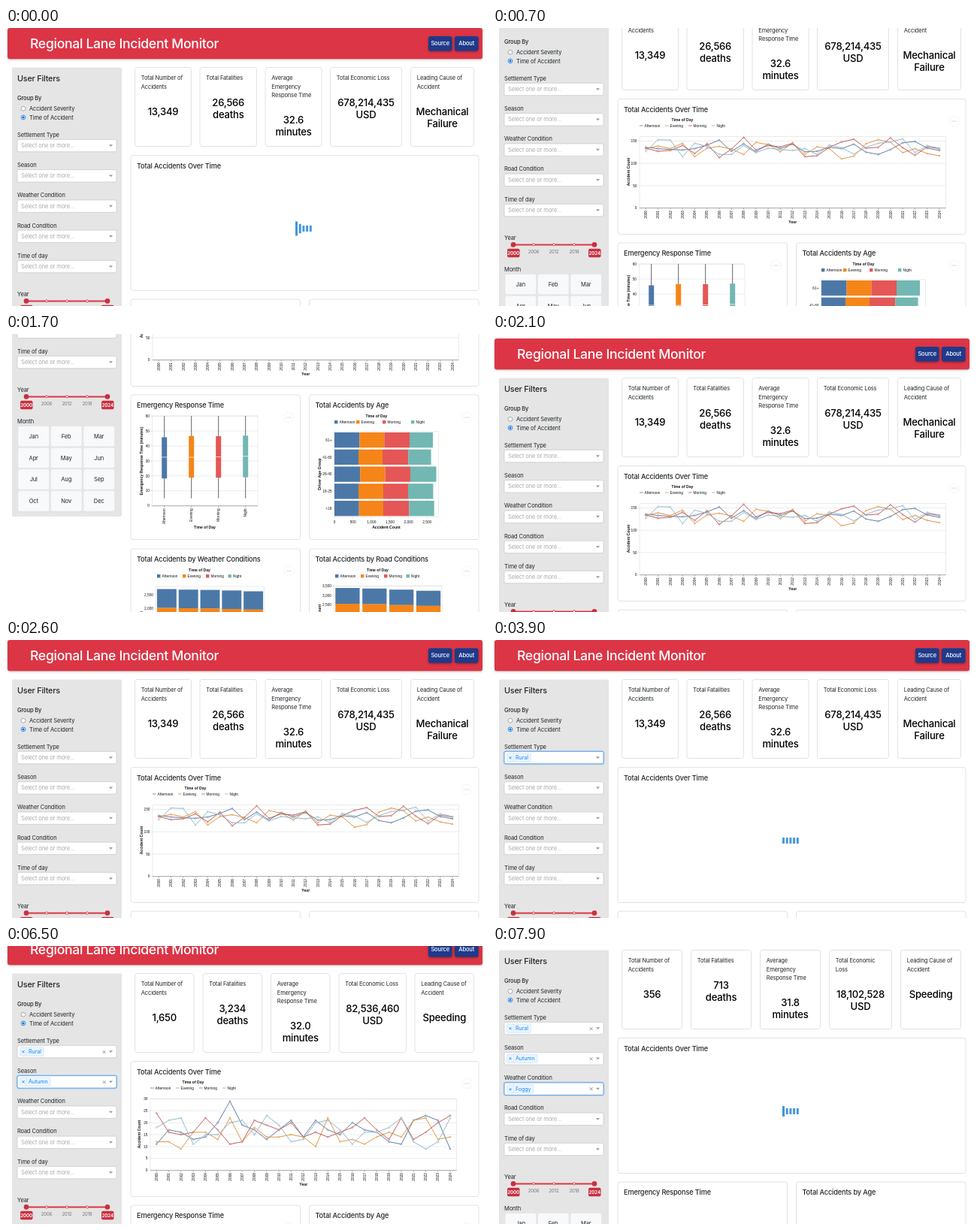
An HTML page with a canvas for the animation above (8000 ms loop, 640 by 370 pixels).

```html
<!DOCTYPE html>
<html lang="en">
<head>
<meta charset="utf-8">
<title>Road incident dashboard</title>
<style>
html, body { margin: 0; width: 100%; height: 100%; overflow: hidden; background: #fff; }
canvas { display: block; width: 640px; height: 370px; }
</style>
</head>
<body>
<canvas id="stage"></canvas>
<script>
const W = 640, H = 370, LOOP = 8000, STEP = 100;
const canvas = document.getElementById('stage');
const ctx = canvas.getContext('2d');
const dpr = window.devicePixelRatio || 1;
canvas.width = W * dpr;
canvas.height = H * dpr;

const UI = 'Inter, sans-serif', PLOT = '"Liberation Sans", Arial, sans-serif';
const INK = '#212529', RED = '#dc3545', KNOB = '#c9303f';
const PERIODS = ['Afternoon', 'Evening', 'Morning', 'Night'];
const FILLS = ['#4c78a8', '#f58518', '#e45756', '#72b7b2'];
const STROKES = ['#57799f', '#dc923f', '#bd5754', '#8db6ca'];

// Time, scroll position
const SCROLL = [[500, 0], [600, 20], [800, 130], [1000, 250], [1200, 350], [1400, 392], [1500, 396],
  [1600, 355], [1700, 280], [1800, 180], [1900, 85], [2000, 15], [2100, -6], [2300, -3], [2600, 0],
  [5900, 0], [6000, 3], [6500, 16], [6700, 40], [6800, 47]];
const LOADS = [[-300, 200], [3900, 4300], [6000, 6400], [7740, 8300]];

const CARD_LABELS = [['Total Number of', 'Accidents'], ['Total Fatalities'],
  ['Average', 'Emergency', 'Response Time'], ['Total Economic Loss'], ['Leading Cause of', 'Accident']];
const SUMMARIES = [
  { from: 0, x: [171.5, 258, 345, 431.5, 538.5], right: [246.5, 333.5, 420, 526.5, 622.5],
    values: ['13,349', '26,566|deaths', '32.6|minutes', '678,214,435|USD', 'Mechanical|Failure'] },
  { from: 4000, x: [171.5, 258, 345, 431.5, 538.5], right: [246.5, 333.5, 420, 526.5, 622.5],
    values: ['6,652', '13,214|deaths', '32.4|minutes', '336,870,212|USD', 'Mechanical|Failure'] },
  { from: 6200, x: [171.5, 262, 352.5, 443, 544], right: [250, 340.5, 431, 532.5, 622.5],
    values: ['1,650', '3,234|deaths', '32.0|minutes', '82,536,460|USD', 'Speeding'] },
  { from: 7800, x: [171.5, 263.5, 355.5, 447.5, 542.5], right: [251.5, 343.5, 435.5, 530.5, 622.5],
    values: ['356', '713|deaths', '31.8|minutes', '18,102,528|USD', 'Speeding'], wrapLoss: true }
];

const FILTERS = [
  { label: 'Settlement Type', y: 142, tag: 'Rural', open: 3000, pick: 3600, close: 3900, clear: 4000, blur: 5000,
    options: ['Rural', 'Urban'], hover: 0 },
  { label: 'Season', y: 182.3, tag: 'Autumn', open: 5000, pick: 5800, close: 6000, clear: 6100, blur: 7000,
    options: ['Autumn', 'Spring', 'Summer', 'Winter'], hover: 0 },
  { label: 'Weather Condition', y: 222.6, tag: 'Foggy', open: 7000, pick: 7500, close: 7600, clear: 7700, blur: 9000,
    options: ['Clear', 'Foggy', 'Rainy', 'Snowy', 'Windy'], hover: 1 },
  { label: 'Road Condition', y: 262.8 },
  { label: 'Time of day', y: 303 }
];

function seeded(seed) {
  return () => (seed = (seed * 16807) % 2147483647) / 2147483647;
}
const random = seeded(4217);
const ruralSeries = PERIODS.map(() => Array.from({ length: 25 }, () => 54 + Math.round(random() * 27)));

const TRENDS = [
  { from: 0, max: 160, tick: 50, dx: 0, series: [
    [136, 133, 131, 130, 133, 141, 152, 127, 144, 126, 143, 133, 143, 126, 127, 136, 133, 143, 125, 120, 131, 146, 149, 134, 129],
    [133, 139, 133, 145, 115, 134, 138, 132, 120, 147, 142, 126, 146, 120, 137, 133, 110, 116, 144, 153, 147, 124, 133, 122, 117],
    [134, 127, 129, 140, 122, 144, 113, 132, 158, 130, 140, 137, 145, 115, 117, 136, 148, 154, 134, 136, 157, 135, 118, 137, 133],
    [127, 153, 152, 115, 145, 138, 120, 120, 140, 124, 134, 131, 129, 133, 120, 141, 135, 121, 136, 145, 148, 155, 124, 140, 134]] },
  { from: 4300, max: 90, tick: 20, dx: -3, series: ruralSeries },
  { from: 6400, max: 30, tick: 5, dx: -3, series: [
    [11, 17, 16, 13, 14, 20, 29, 19, 17, 13, 17, 21, 14, 21, 17, 15, 20, 17, 16, 12, 11, 21, 23, 21, 9],
    [12, 12, 9, 16, 16, 13, 22, 12, 18, 14, 14, 15, 14, 10, 22, 12, 13, 11, 14, 16, 14, 21, 22, 13, 14],
    [24, 16, 15, 16, 22, 17, 11, 12, 21, 19, 17, 20, 14, 16, 14, 16, 18, 22, 17, 13, 22, 13, 16, 20, 23],
    [18, 21, 22, 11, 15, 15, 20, 21, 15, 23, 19, 12, 13, 20, 21, 17, 11, 16, 16, 18, 22, 12, 9, 12, 22]] }
];

const latest = (states, t) => states.filter(s => s.from <= t).pop();

function scrollAt(t) {
  const i = SCROLL.findIndex(k => k[0] > t);
  if (i === 0) return 0;
  if (i < 0) return SCROLL[SCROLL.length - 1][1];
  const [t0, y0] = SCROLL[i - 1], [t1, y1] = SCROLL[i];
  return Math.round(y0 + (y1 - y0) * (t - t0) / (t1 - t0));
}

// The y coordinate is the middle of the capitals.
function text(s, x, y, size, { weight = 400, color = INK, align = 'left', font = UI, turn = 0 } = {}) {
  ctx.save();
  ctx.translate(x, y);
  ctx.rotate(turn);
  ctx.font = `${weight} ${size}px ${font}`;
  ctx.letterSpacing = font === UI ? `${-0.017 * size}px` : '0px';
  ctx.textAlign = align;
  ctx.fillStyle = color;
  ctx.fillText(s, 0, size * 0.36);
  ctx.restore();
}

function plotText(s, x, y, align = 'center', bold = false, upright = false) {
  text(s, x, y, bold ? 5.1 : 4.8, { weight: bold ? 700 : 400, align, font: PLOT, color: '#111',
    turn: upright ? -Math.PI / 2 : 0 });
}

function rect(x, y, w, h, fill) {
  ctx.fillStyle = fill;
  ctx.fillRect(x, y, w, h);
}

function box(x, y, w, h, r, fill, stroke, width = 1) {
  ctx.beginPath();
  ctx.roundRect(x, y, w, h, r);
  if (fill) { ctx.fillStyle = fill; ctx.fill(); }
  if (stroke) { ctx.strokeStyle = stroke; ctx.lineWidth = width; ctx.stroke(); }
}

function shadowBox(x, y, w, h, r, fill, blur, shade) {
  ctx.save();
  ctx.shadowColor = shade;
  ctx.shadowBlur = blur * dpr;
  ctx.shadowOffsetY = dpr;
  box(x, y, w, h, r, fill);
  ctx.restore();
}

function line(x0, y0, x1, y1, color, width = 0.6) {
  ctx.beginPath();
  ctx.moveTo(x0, y0);
  ctx.lineTo(x1, y1);
  ctx.strokeStyle = color;
  ctx.lineWidth = width;
  ctx.stroke();
}

function disc(x, y, r, fill, stroke, width = 1) {
  ctx.beginPath();
  ctx.arc(x, y, r, 0, Math.PI * 2);
  if (fill) { ctx.fillStyle = fill; ctx.fill(); }
  if (stroke) { ctx.strokeStyle = stroke; ctx.lineWidth = width; ctx.stroke(); }
}

function drawHeader() {
  shadowBox(2, 0, 632, 41.2, 3, RED, 3, 'rgba(0,0,0,.25)');
  text('Regional Lane Incident Monitor', 32, 21, 17.6, { weight: 500, color: '#fff' });
  [['Source', 562], ['About', 597]].forEach(([label, x]) => {
    shadowBox(x, 11, 31.5, 19.5, 3, '#1e3a8a', 3, 'rgba(0,0,0,.4)');
    text(label, x + 15.7, 20.7, 7.5, { weight: 500, color: '#fff', align: 'center' });
  });
}

function drawFilter(f, t) {
  const top = f.y + 6.3, mid = f.y + 14.4;
  const focused = t >= f.open && t < f.blur;
  text(f.label, 15, f.y, 7.5);
  if (focused) box(14.6, top - 0.4, 132.8, 17.3, 2.5, null, 'rgba(0,126,255,.18)', 2);
  box(15, top, 132, 16.5, 2, '#fff', focused ? '#3f8fe0' : '#ccc', 0.8);
  if (t >= f.pick) {
    ctx.font = `400 7.2px ${UI}`;
    const w = ctx.measureText(f.tag).width + 14;
    box(18.7, top + 2.5, w, 11.5, 1, '#ebf5ff', '#c2e0ff', 0.6);
    line(27.2, top + 2.5, 27.2, top + 14, '#c2e0ff');
    text('×', 22.9, mid - 0.2, 7.5, { color: '#007eff', align: 'center' });
    text(f.tag, 30, mid, 7.2, { color: '#1685f8' });
  } else {
    text('Select one or more...', 20, mid, 7.5, { color: '#aaa' });
  }
  if (t >= f.clear) text('×', 130.5, mid - 0.2, 9.5, { color: '#999', align: 'center' });
  ctx.beginPath();
  ctx.moveTo(137, mid - 1.2);
  ctx.lineTo(142, mid - 1.2);
  ctx.lineTo(139.5, mid + 1.5);
  ctx.fillStyle = '#999';
  ctx.fill();
}

function drawMenu(f, t) {
  if (!(t >= f.open && t < f.close)) return;
  const top = f.y + 23, row = 16.5;
  shadowBox(15, top, 132, row * f.options.length + 0.5, 1, '#fff', 2, 'rgba(0,0,0,.12)');
  box(15, top, 132, row * f.options.length + 0.5, 1, null, '#ccc', 0.6);
  const active = t >= f.open + 500 ? f.hover : 0;
  f.options.forEach((name, i) => {
    if (i === active) rect(15.4, top + i * row + 0.3, 131.2, row, t >= f.open + 500 ? '#e6f2ff' : '#f2f8ff');
    text(name, 20, top + (i + 0.5) * row, 7.5, { color: i === active ? '#333' : '#666' });
  });
}

function drawSidebar(t) {
  box(8, 52.5, 146, 470.5, 2, '#e5e5e5');
  text('User Filters', 15, 67, 10.8, { weight: 500 });
  text('Group By', 15, 93.6, 7.5, { weight: 500 });
  disc(23, 107.3, 2.9, '#fff', '#777', 0.6);
  disc(23, 118.9, 2.9, '#fff', '#0b6fe0', 0.8);
  disc(23, 118.9, 1.6, '#0b6fe0');
  text('Accident Severity', 31, 107.5, 7.5);
  text('Time of Accident', 31, 119, 7.5);
  FILTERS.forEach(f => drawFilter(f, t));

  text('Year', 15, 354.3, 7.5);
  line(27, 363.4, 135, 363.4, RED, 2);
  [54, 81, 108].forEach((x, i) => {
    disc(x, 363.4, 1.5, '#fff', KNOB, 0.8);
    text(String(2006 + i * 6), x, 373.3, 6, { color: '#777', align: 'center' });
  });
  [[27, '2000'], [135, '2024']].forEach(([x, year]) => {
    disc(x, 363.4, 3.3, KNOB);
    box(x - 8, 368.8, 16.5, 11.4, 2, KNOB);
    text(year, x + 0.2, 374.5, 6.2, { weight: 600, color: '#fff', align: 'center' });
  });

  text('Month', 15, 396, 7.5);
  'Jan Feb Mar Apr May Jun Jul Aug Sep Oct Nov Dec'.split(' ').forEach((month, i) => {
    const x = 16 + (i % 3) * 43.5, y = 402.5 + Math.floor(i / 3) * 28.7;
    box(x, y, 41.5, 27.3, 2.5, '#f8f9fa', '#dfe3e6', 0.6);
    text(month, x + 20.7, y + 13.7, 7.5, { align: 'center' });
  });
  FILTERS.forEach(f => drawMenu(f, t));
}

function drawSummary(t) {
  const state = latest(SUMMARIES, t);
  state.values.forEach((value, i) => {
    const x = state.x[i], right = state.right[i];
    const label = i === 3 && state.wrapLoss ? ['Total Economic', 'Loss'] : CARD_LABELS[i];
    box(x, 52.5, right - x, 105, 3, '#fff', '#d9dbdd', 0.8);
    label.forEach((s, n) => text(s, x + 8.3, 66.6 + n * 11.5, 7.5));
    value.split('|').forEach((s, n) =>
      text(s, (x + right) / 2, 99.6 + (label.length - 1) * 11.5 + n * 15.8, 13.1,
        { weight: 500, align: 'center', color: '#000' }));
  });
}

function drawLoader(x, y, elapsed) {
  for (let i = 0; i < 5; i++) {
    const phase = ((elapsed - i * 180) / 1000) % 1;
    const pulse = phase > 0 ? Math.max(0, 1 - Math.abs(phase - 0.3) / 0.3) : 0;
    const h = 8 + 11 * pulse;
    rect(x - 11.5 + i * 4.7, y - h / 2, 3, h, pulse > 0.3 ? '#3f97d8' : '#4a98dc');
  }
}

function frame(x, y, w, h, title) {
  box(x, y, w, h, 3, '#fff', '#d9dbdd', 0.8);
  text(title, x + 8, y + 14, 9.2, { weight: 500 });
}

function dots(x, y) {
  disc(x, y, 6.8, '#fff', '#f1f1f1', 0.8);
  [-2.4, 0, 2.4].forEach(d => disc(x + d, y, 0.6, '#aaa'));
}

function legend(title, y, xs, lines) {
  plotText('Time of Day', title, y, 'center', true);
  PERIODS.forEach((name, i) => {
    if (lines) line(xs[i], y + 8, xs[i] + 4.7, y + 8, STROKES[i], 0.8);
    else rect(xs[i], y + 6, 4.4, 4.4, FILLS[i]);
    plotText(name, xs[i] + 6.6, y + 8.2, 'left');
  });
}

function drawTrend(t) {
  const { max, tick, dx, series } = latest(TRENDS, t);
  const left = 195 + dx, right = 602.5 + dx, bottom = 314.6, top = 219.5;
  const px = i => 203.3 + dx + i * 16.28, py = v => bottom - v / max * (bottom - top);
  legend(252 + dx, 197, [195, 229, 260, 291].map(x => x + dx), true);
  box(left, top, right - left, bottom - top, 0, null, '#ddd', 0.6);
  for (let v = 0; v <= max; v += tick) {
    line(left - 2.4, py(v), right, py(v), '#ddd');
    plotText(String(v), left - 3.5, py(v), 'right');
  }
  line(left, bottom, right, bottom, '#888');
  for (let i = 0; i < 25; i++) {
    line(px(i), bottom, px(i), bottom + 2.4, '#888');
    plotText(String(2000 + i), px(i), bottom + 3.4, 'right', false, true);
  }
  series.forEach((values, s) => {
    ctx.beginPath();
    values.forEach((v, i) => ctx.lineTo(px(i), py(v)));
    ctx.strokeStyle = STROKES[s];
    ctx.lineWidth = 0.95;
    ctx.stroke();
    values.forEach((v, i) => disc(px(i), py(v), 0.9, '#fff', STROKES[s], 0.7));
  });
  plotText('Accident Count', left - 14.5, 266.5, 'center', true, true);
  plotText('Year', (left + right) / 2, 333, 'center', true);
  dots(613.5, 199);
}

function drawResponse() {
  const left = 194.5, right = 335, bottom = 508.7;
  const py = v => bottom - v * 1.993;
  box(left, py(60), right - left, bottom - py(60), 0, null, '#ddd', 0.6);
  for (let v = 0; v <= 60; v += 10) {
    line(left - 2.4, py(v), right, py(v), '#ddd');
    plotText(String(v), left - 3.5, py(v), 'right');
  }
  line(left, bottom, right, bottom, '#888');
  const quartiles = [[45.8, 32.5, 18.3], [46.6, 32.4, 18.8], [46.5, 32.7, 18.8], [46.9, 33.1, 19.1]];
  quartiles.forEach(([q3, median, q1], i) => {
    const x = 210.7 + i * 36;
    line(x, py(60), x, py(5), '#222', 0.7);
    rect(x - 3.5, py(q3), 7, py(q1) - py(q3), FILLS[i]);
    line(x - 3.5, py(median), x + 3.5, py(median), '#fff', 0.7);
    line(x, bottom, x, bottom + 2.4, '#888');
    plotText(PERIODS[i], x, bottom + 3.6, 'right', false, true);
  });
  plotText('Emergency Response Time (minutes)', 179.8, 449, 'center', true, true);
  plotText('Time of Day', 264.5, 537.3, 'center', true);
  dots(376.5, 391);
}

function drawAges() {
  const left = 437, right = 575.5, top = 409.7, bottom = 523.5, row = 22.75;
  legend(493, 389, [437, 466, 501, 539]);
  for (let i = 0; i <= 5; i++) {
    const x = left + i * 24.65;
    line(x, top, x, bottom + 2.4, '#ddd');
    plotText((i * 500).toLocaleString('en-US'), x, bottom + 6.3);
  }
  box(left, top, right - left, bottom - top, 0, null, '#ddd', 0.6);
  const ends = [[470.5, 503.3, 537, 568], [469, 501, 535.3, 565.6], [471.2, 504.5, 538, 572.5],
    [469, 502, 535, 568.4], [469.7, 502, 536.3, 569.7]];
  ['61+', '41-60', '26-40', '18-25', '<18'].forEach((name, r) => {
    const y = top + r * row + 1.2;
    ends[r].forEach((end, i) => {
      const start = i ? ends[r][i - 1] : left;
      rect(start, y, end - start, row - 2.4, FILLS[i]);
    });
    plotText(name, left - 3.5, y + row / 2 - 1.2, 'right');
  });
  plotText('Driver Age Group', 417.5, 466.5, 'center', true, true);
  plotText('Accident Count', 506, 537.3, 'center', true);
  dots(613.5, 391);
}

function drawStacks({ x, right, bottom, unit, top, ticks, names, totals, title, menu }) {
  const step = (right - x) / names.length;
  legend(x + 58, 594, [1.5, 35.5, 66.5, 96].map(d => x + d));
  box(x, top, right - x, bottom - top, 0, null, '#ddd', 0.6);
  for (let v = 0; v <= ticks; v += 500) {
    line(x - 2.4, bottom - v * unit, right, bottom - v * unit, '#ddd');
    plotText(v.toLocaleString('en-US'), x - 3.5, bottom - v * unit, 'right');
  }
  names.forEach((name, n) => {
    const h = totals[n] * unit / 4, bx = x + n * step + step * 0.05;
    FILLS.forEach((fill, i) => rect(bx, bottom - (4 - i) * h, step * 0.9, h + 0.1, fill));
    plotText(name, x + (n + 0.5) * step, bottom + 3.6, 'right', false, true);
  });
  plotText('Accident Count', x - 19, (top + bottom) / 2, 'center', true, true);
  plotText(title, (x + right) / 2, 751, 'center', true);
  dots(menu, 595.5);
}

const WEATHER = { x: 199.5, right: 343.5, bottom: 719.5, unit: 0.0369, top: 616, ticks: 2500, title: 'Weather Condition',
  names: ['Clear', 'Foggy', 'Rainy', 'Snowy', 'Windy'], totals: [2710, 2690, 2680, 2660, 2630], menu: 376.5 };
const ROADS = { x: 436.5, right: 580, bottom: 702, unit: 0.0247, top: 615.4, ticks: 3500, title: 'Road Condition',
  names: ['Dry', 'Icy', 'Snow-covered', 'Wet'], totals: [3400, 3370, 3310, 3250], menu: 613.5 };

function drawCharts(t) {
  const panels = [[166, 169.5, 463, 180, 'Total Accidents Over Time'],
    [166, 361, 225.5, 192.5, 'Emergency Response Time'], [403.5, 361, 225.5, 192.5, 'Total Accidents by Age'],
    [166, 566, 225.5, 192.5, 'Total Accidents by Weather Conditions'],
    [403.5, 566, 225.5, 192.5, 'Total Accidents by Road Conditions']];
  panels.forEach(p => frame(...p));
  const load = LOADS.find(([start, end]) => t >= start && t < end);
  if (load) {
    panels.forEach(([x, y, w, h]) => drawLoader(x + w / 2 - 1, y + h / 2 + 7.5, t - load[0]));
    return;
  }
  drawTrend(t);
  drawResponse();
  drawAges();
  drawStacks(WEATHER);
  drawStacks(ROADS);
}

function draw(t) {
  ctx.setTransform(dpr, 0, 0, dpr, 0, 0);
  rect(0, 0, W, H, '#fff');
  ctx.translate(0, -scrollAt(t));
  drawSummary(t);
  drawCharts(t);
  drawSidebar(t);
  drawHeader();
}

const began = performance.now();
function tick() {
  const t = (performance.now() - began) % LOOP;
  draw(Math.floor(t / STEP) * STEP);
  requestAnimationFrame(tick);
}
tick();
</script>
</body>
</html>
```
